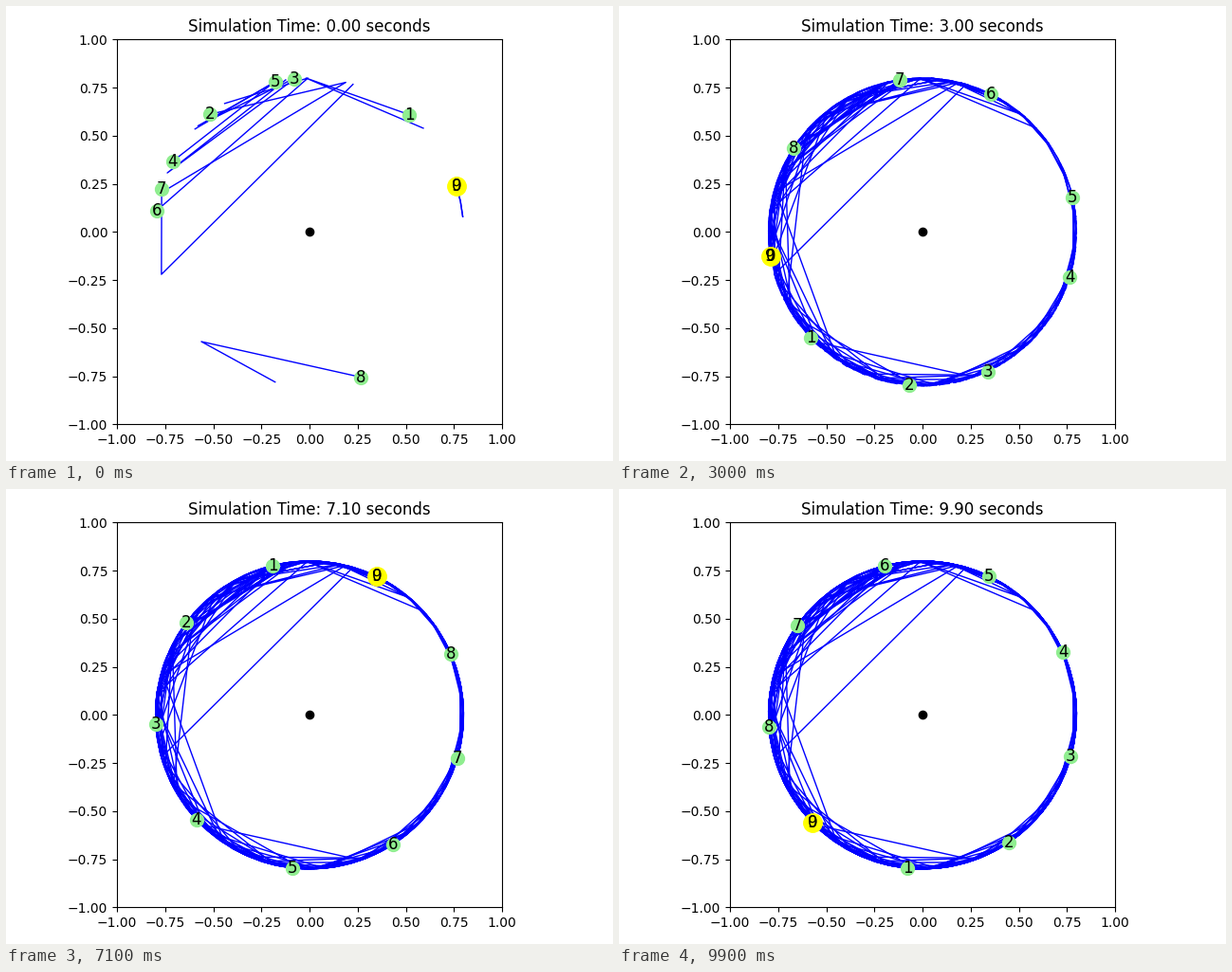
Animation, 640 px wide and 480 px high, one loop 10000 ms. Source, as a matplotlib script:

```python
import numpy as np
import matplotlib.pyplot as plt
from matplotlib.animation import FuncAnimation

FRAMES = 100
DT = 0.1
WARMUP = 2          # steps already taken when the clock shows zero
RADIUS = 0.8
SPEED = 1.0         # rad/s of the leader

# Starting angles of followers 1..8, in degrees
START = [42.4, 165.4, 98.9, 138.0, 96.1, 123.4, 73.6, 257.1]


def simulate():
    """Each follower moves to the midpoint of its neighbours while all rotate."""
    turn = SPEED * DT
    angles = np.concatenate([[turn], np.radians(START), [turn + 2 * np.pi]])
    history = [angles]
    for _ in range(FRAMES + WARMUP - 1):
        nxt = angles + turn
        nxt[1:-1] = (angles[:-2] + angles[2:]) / 2 + turn
        angles = nxt
        history.append(angles)
    return np.array(history)


track = simulate()
xs, ys = RADIUS * np.cos(track), RADIUS * np.sin(track)
count = track.shape[1]

plt.rcParams["font.family"] = "DejaVu Sans"
fig = plt.figure(figsize=(6.4, 4.8), dpi=100)
ax = fig.add_axes([117 / 640, 38.6 / 480, 406 / 640, 406 / 480])
ax.set_xlim(-1, 1)
ax.set_ylim(-1, 1)
ticks = np.linspace(-1, 1, 9)
ax.set_xticks(ticks)
ax.set_yticks(ticks)
title = ax.set_title("", fontsize=12)

ax.plot(0, 0, "o", color="black", markersize=6)
trails = [ax.plot([], [], color="blue", lw=1, zorder=2)[0] for _ in range(count)]
followers, = ax.plot([], [], "o", color="lightgreen", markersize=10, zorder=3)
leader, = ax.plot([], [], "o", color="yellow", markersize=14, zorder=4)
labels = [ax.text(0, 0, str(i), fontsize=12, ha="center", va="center", zorder=5)
          for i in range(count)]


def update(frame):
    now = frame + WARMUP
    for i in range(count):
        trails[i].set_data(xs[:now + 1, i], ys[:now + 1, i])
        labels[i].set_position((xs[now, i], ys[now, i]))
    followers.set_data(xs[now, 1:], ys[now, 1:])
    leader.set_data(xs[now, :1], ys[now, :1])
    title.set_text(f"Simulation Time: {frame * DT:.2f} seconds")
    return [*trails, followers, leader, *labels, title]


anim = FuncAnimation(fig, update, frames=FRAMES, init_func=lambda: update(0),
                     interval=1000 * DT, repeat=True, repeat_delay=0)
plt.show()
```
